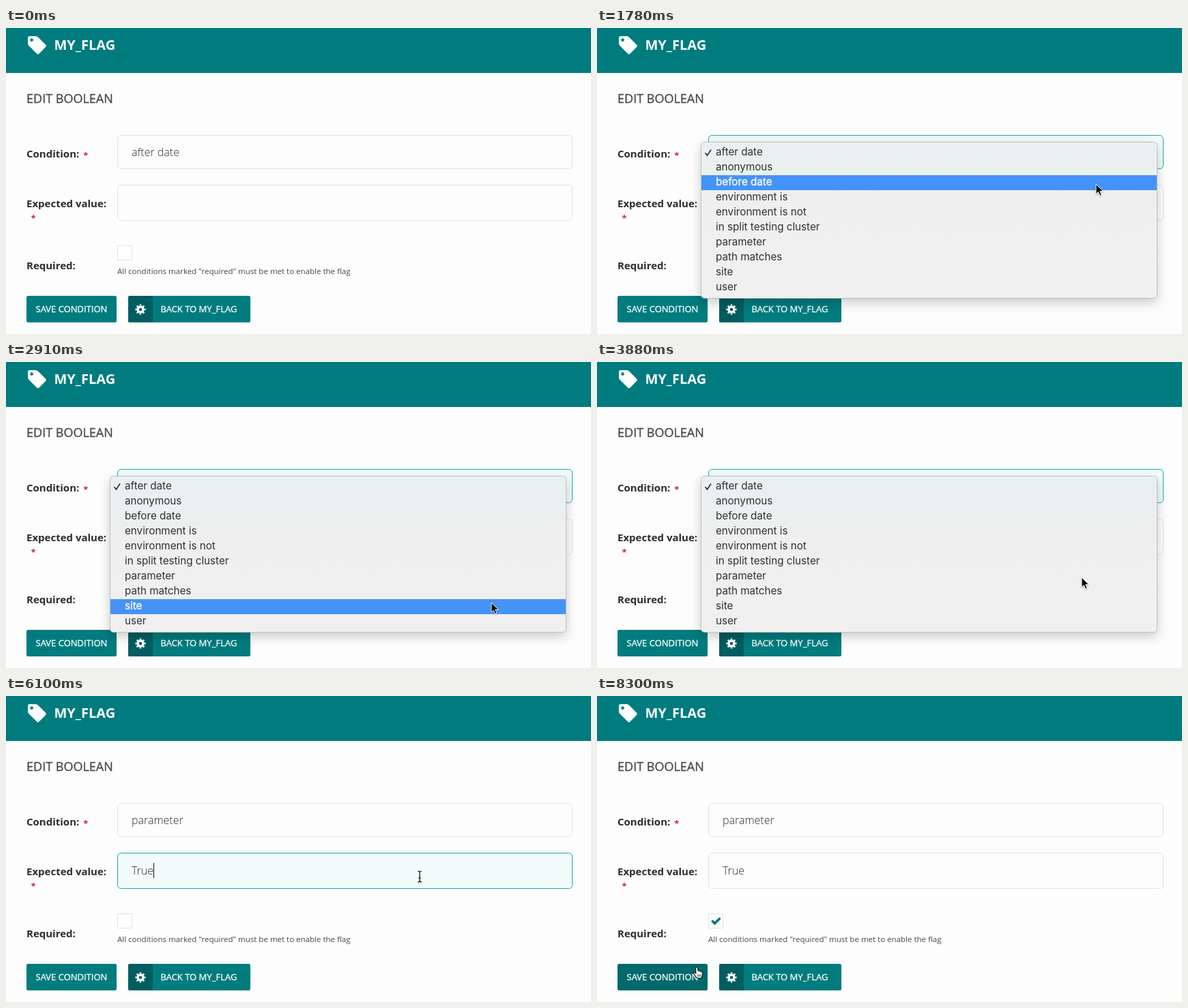
An HTML page that plays this animation: 857 px wide and 449 px high, repeating every 9820 ms.

```html
<!DOCTYPE html>
<html lang="en">
<head>
<meta charset="utf-8">
<title>Edit boolean</title>
<style>
html, body { margin: 0; width: 100%; height: 100%; overflow: hidden; background: #fdfdfd; }
svg { display: block; width: 100%; height: 100%; font-family: "Open Sans", sans-serif; cursor: default; }
.teal { fill: #007c7e; }
.label { font-size: 15px; font-weight: 700; fill: #2d2d2d; }
.star { font-size: 13px; font-weight: 700; fill: #cc2538; }
.value { font-size: 16px; font-weight: 300; fill: #2b2b2b; }
.field { fill: #f1fcfb; stroke: #e1e3e3; }
.field.focus { stroke: #12ada8; }
.button { font-size: 13px; fill: #fff; stroke: #fff; stroke-width: .3; }
.panel { fill: url(#glass); stroke: #bfc1c1; filter: drop-shadow(0 6px 8px rgba(0, 0, 0, .2)); }
.row { font: 15.2px Inter, sans-serif; fill: #303030; }
.row.on { fill: #fff; stroke: #fff; stroke-width: .3; }
.arrow { filter: drop-shadow(0 1px 1px rgba(0, 0, 0, .3)); }
</style>
</head>
<body>
<svg viewBox="0 0 857 449">
  <defs>
    <linearGradient id="glass" x2="0" y2="1">
      <stop stop-color="#e9f0f0"/>
      <stop offset=".17" stop-color="#eaf0f0"/>
      <stop offset=".4" stop-color="#efefef"/>
      <stop offset="1" stop-color="#f0f0f0"/>
    </linearGradient>
  </defs>

  <rect class="teal" width="857" height="66"/>
  <path fill="#fff" d="M32 14.5q0-2.5 2.5-2.5h9q2 0 3.5 1.5l11 11q1.8 1.8 0 3.6l-9.4 9.4q-1.8 1.8-3.6 0l-11.5-11.4q-1.5-1.5-1.5-3.5z"/>
  <circle class="teal" cx="37.6" cy="17.6" r="2.3"/>
  <text x="70.5" y="32" font-size="20" font-weight="700" fill="#fff">MY_FLAG</text>
  <text x="30" y="110" font-size="18" fill="#484848" stroke="#484848" stroke-width=".3">EDIT BOOLEAN</text>

  <text class="label" x="30" y="190">Condition:</text>
  <text class="star" x="113.3" y="192">*</text>
  <text class="label" x="30" y="263">Expected value:</text>
  <text class="star" x="36.5" y="284">*</text>
  <text class="label" x="30" y="354">Required:</text>

  <rect id="condition" class="field" x="163.5" y="157.5" width="666" height="49" rx="5"/>
  <text id="choice" class="value" x="184" y="188"></text>
  <rect id="expected" class="field" x="163.5" y="230.5" width="666" height="52" rx="5"/>
  <text id="typed" class="value" x="184" y="262"></text>
  <rect id="caret" y="245" width="1" height="22" fill="#111"/>

  <rect x="163.5" y="319.5" width="21" height="21" fill="#fff" stroke="#e1e3e3"/>
  <path id="check" d="M168.3 329.6l4.2 4.2 8-8" fill="none" stroke="#00787a" stroke-width="3.5"/>
  <text x="163" y="361" font-size="11.53" fill="#484848">All conditions marked "required" must be met to enable the flag</text>

  <rect id="save" class="teal" x="30" y="393" width="132" height="39" rx="2.5"/>
  <text class="button" x="43.5" y="417">SAVE CONDITION</text>
  <rect class="teal" x="179" y="393" width="179" height="39" rx="2.5"/>
  <path fill="#005d60" d="M215 393v39h-33.500q-2.500 0-2.500-2.500v-34q0-2.500 2.500-2.500z"/>
  <g transform="translate(197 413)" fill="none" stroke="#fff">
    <circle r="4" stroke-width="3.400"/>
    <circle r="6.200" stroke-width="2.800" pathLength="16" stroke-dasharray="1" stroke-dashoffset=".5"/>
  </g>
  <text class="button" x="226.5" y="417">BACK TO MY_FLAG</text>

  <g id="menu">
    <rect class="panel" x="152.500" y="167.500" width="668" height="229" rx="5"/>
    <rect id="bar" x="153" width="667" height="22" fill="#4593f8"/>
    <path id="tick" d="M158.500 183.300l3 3.700 5.500-8.500" fill="none" stroke-width="1.700"/>
  </g>

  <g id="cursor">
    <path class="arrow" d="M0 0V14.600L3.300 11.500 5.700 17 8.100 16 5.800 10.600H10.400Z" stroke="#fff"/>
    <g class="beam" fill="none">
      <path d="M-3-8Q0-8 0-6Q0-8 3-8M0-6V6M-3 8Q0 8 0 6Q0 8 3 8M-1.800 2H1.800" stroke="#fff" stroke-width="3" opacity=".8"/>
      <path d="M-3-8Q0-8 0-6Q0-8 3-8M0-6V6M-3 8Q0 8 0 6Q0 8 3 8M-1.800 2H1.800" stroke="#000" stroke-width="1.200"/>
    </g>
    <g class="hand" stroke="#000">
      <path fill="#fff" d="M-1.500 1.200a1.500 1.500 0 0 1 3 0L2 5.500Q3.800 4.500 4.400 6 6.200 5.400 6.800 7 8.800 6.600 8.800 8.800L8.200 12.500 7 16H.5L-2.500 12-4.600 9Q-4.800 7-2.600 8L-1 9.500Z"/>
      <path d="M1.700 10.500v3.500M3.900 10.500v3.500M6.100 10.500v3.500" stroke-width=".8"/>
    </g>
  </g>
</svg>
<script>
const LOOP = 9820, LEAD = 528, TICK = 88.1;
const ROW_TOP = 172, ROW_H = 22;
const OPTIONS = ["after date", "anonymous", "before date", "environment is", "environment is not",
  "in split testing cluster", "parameter", "path matches", "site", "user"];

// Pointer path: tick, x, y, eased arrival
const PATH = [
  [0, 822, 167], [3, 741, 179, 1], [12, 741, 179], [14, 731, 229], [18, 713.5, 332],
  [24, 711, 380], [25, 711, 380], [27, 711, 353], [31, 710, 316], [42, 710, 316],
  [48, 606, 265, 1], [66, 606, 265], [76, 173, 328, 1], [82, 173, 328], [88, 146, 398, 1]
];

const $ = id => document.getElementById(id);
const [arrow, beam, hand] = $("cursor").children;
const show = (el, on) => { el.style.display = on ? "" : "none"; };
const within = (n, from, to) => n >= from && n < to;

const rows = OPTIONS.map((name, i) => {
  const text = document.createElementNS("http://www.w3.org/2000/svg", "text");
  text.setAttribute("x", 174);
  text.setAttribute("y", ROW_TOP + ROW_H * i + 15);
  text.textContent = name;
  $("menu").append(text);
  return text;
});

// Latest value of a [tick, value, ...] list
function step(n, first, ...changes) {
  let value = first;
  for (let i = 0; i < changes.length; i += 2) if (n >= changes[i]) value = changes[i + 1];
  return value;
}

function pointer(n) {
  const i = PATH.findIndex(k => k[0] > n);
  if (i < 0) return PATH[PATH.length - 1].slice(1, 3);
  if (i === 0) return PATH[0].slice(1, 3);
  const [a, b] = [PATH[i - 1], PATH[i]];
  let p = (n - a[0]) / (b[0] - a[0]);
  if (b[3]) p = p * p * (3 - 2 * p);
  return [a[1] + (b[1] - a[1]) * p, a[2] + (b[2] - a[2]) * p];
}

function setField(el, focused, tint) {
  el.classList.toggle("focus", focused);
  el.setAttribute("fill-opacity", tint);
}

function drawMenu(n, y) {
  show($("menu"), within(n, 6, 42));
  $("menu").style.opacity = step(n, 1, 40, .6, 41, .2);
  const active = n === 38 ? -1 : Math.floor((y - ROW_TOP) / ROW_H);
  show($("bar"), active >= 0);
  $("bar").setAttribute("y", ROW_TOP + ROW_H * active);
  $("tick").setAttribute("stroke", active === 0 ? "#fff" : "#303030");
  rows.forEach((row, i) => row.setAttribute("class", i === active ? "row on" : "row"));
}

function drawPointer(n, x, y) {
  const onText = within(x, 163, 830) && within(y, 230, 283) && n > 42;
  const onSave = within(x, 30, 162) && y > 392;
  show($("cursor"), n >= 0);
  show(arrow, !onText && !onSave);
  show(beam, onText);
  show(hand, onSave);
  $("cursor").setAttribute("transform", `translate(${x} ${y})`);
}

function draw(t) {
  const n = Math.floor((t - LEAD) / TICK);
  const [x, y] = pointer(n);

  setField($("condition"), within(n, 6, 48), step(n, 0, 6, .5, 7, 1, 48, 0));
  setField($("expected"), within(n, 48, 76), step(n, 0, 48, .6, 50, 1, 76, .6, 77, .3, 78, 0));
  $("choice").textContent = OPTIONS[n < 40 ? 0 : 6];

  const typed = "True".slice(0, step(n, 0, 54, 1, 60, 2, 62, 3, 63, 4));
  $("typed").textContent = typed;
  const width = typed ? $("typed").getComputedTextLength() : 0;
  $("caret").setAttribute("x", Math.round(184 + width));
  show($("caret"), within(n, 48, 76) && n !== 59 && !within(n, 69, 75));

  show($("check"), n >= 77);
  $("save").style.fill = step(n, "", 87, "#007274", 88, "#00696b");
  drawMenu(n, y);
  drawPointer(n, x, y);
}

const start = performance.now();
function loop() {
  draw((performance.now() - start) % LOOP);
  requestAnimationFrame(loop);
}
loop();
</script>
</body>
</html>
```
